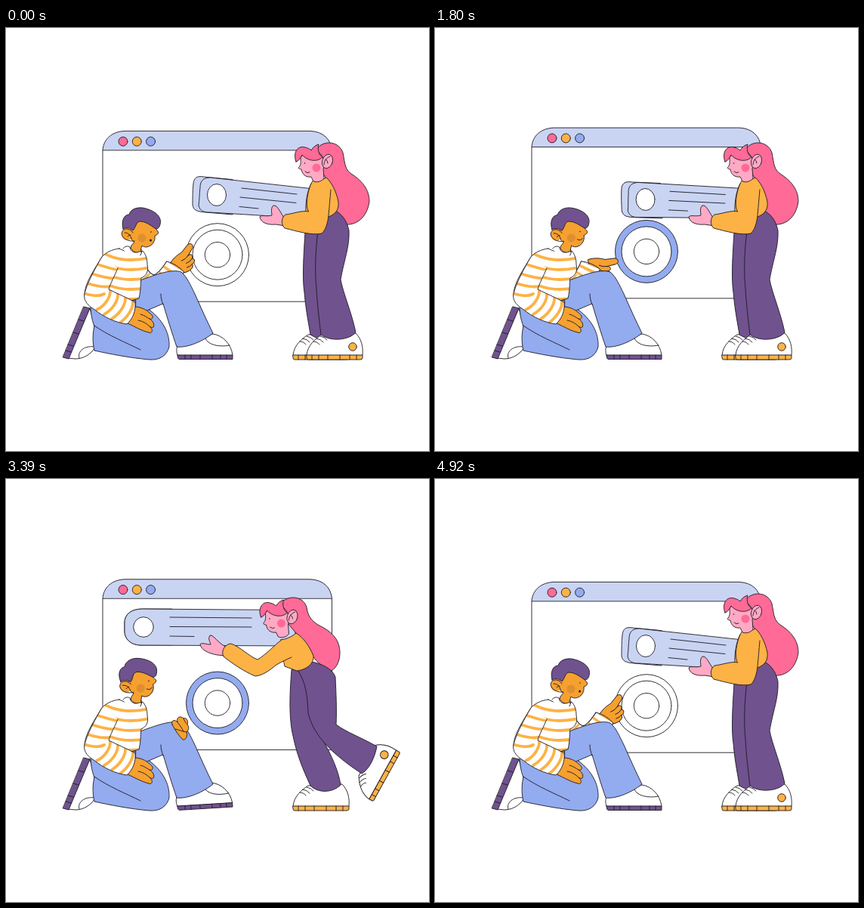
An HTML page with a canvas for the animation above (4.95 s loop, 560 by 560 pixels).

```html
<!DOCTYPE html>
<html lang="en">
<head>
<meta charset="utf-8">
<title>Building a page</title>
<style>
html, body { margin: 0; width: 100%; height: 100%; overflow: hidden; background: #fff; }
canvas { display: block; width: 100vw; height: 100vh; }
</style>
</head>
<body>
<canvas id="stage"></canvas>
<script>
const LOOP = 4950;
const INK = '#1f1b24', WHITE = '#fff', PALE = '#c9d4f3', BLUE = '#93abef', PURPLE = '#70528f',
  PINK = '#ff6a97', ROSE = '#ffa9c5', ORANGE = '#fdb245', TAN = '#f6a02f', AMBER = '#e08f30';
const canvas = document.getElementById('stage');
const c = canvas.getContext('2d');
const ratio = window.devicePixelRatio || 1;
canvas.width = canvas.height = 560 * ratio;

const rad = d => d * Math.PI / 180;
const lerp = (a, b, k) => a + (b - a) * k;
const clamp = k => Math.min(1, Math.max(0, k));
const part = (t, a, b) => clamp((t - a) / (b - a));
const cubic = p => p < .5 ? 4 * p ** 3 : 1 - 4 * (1 - p) ** 3;
const sine = p => .5 - .5 * Math.cos(Math.PI * p);

// Eased value from rows of [time, value]
function keyed(t, rows) {
  for (let i = 1; i < rows.length; i++) {
    if (t <= rows[i][0]) {
      const [t0, a] = rows[i - 1], [t1, b] = rows[i];
      return lerp(a, b, sine(part(t, t0, t1)));
    }
  }
  return rows[rows.length - 1][1];
}

// Blend of two path strings with the same commands
function mix(a, b, k) {
  const ends = b.match(/-?[\d.]+/g);
  let i = 0;
  return new Path2D(a.replace(/-?[\d.]+/g, v => lerp(+v, +ends[i++], k).toFixed(2)));
}

const asPath = p => typeof p === 'string' ? new Path2D(p) : p;

function shape(p, fill, ink = INK) {
  p = asPath(p);
  if (fill) { c.fillStyle = fill; c.fill(p); }
  if (ink) { c.strokeStyle = ink; c.stroke(p); }
}
const line = p => shape(p, null);

function oval(x, y, rx, ry, fill, ink = INK, turn = 0) {
  const p = new Path2D();
  p.ellipse(x, y, rx, ry, turn, 0, Math.PI * 2);
  shape(p, fill, ink);
}
const disc = (x, y, r, fill, ink) => oval(x, y, r, r, fill, ink);

function group(draw, x = 0, y = 0, turn = 0, px = 0, py = 0) {
  c.save();
  c.translate(x + px, y + py);
  c.rotate(rad(turn));
  c.translate(-px, -py);
  draw();
  c.restore();
}

function striped(path, draw) {
  shape(path, WHITE, null);
  c.save();
  c.clip(path);
  c.lineWidth = 3.8;
  c.strokeStyle = ORANGE;
  draw();
  c.restore();
}
const stripe = d => c.stroke(new Path2D(d));

function drawWindow(t) {
  shape('M128 162V362H431.5V162', WHITE);
  shape('M128 161.3C129 147 140 137 157 136.2H403C420 137 430 147 431.5 161.3Z', PALE);
  [PINK, ORANGE, BLUE].forEach((col, i) => disc(155 + 18.3 * i, 150, 6, col));

  const sweep = t < 4030 ? part(t, 150, 1630) * 360 : 0;
  if (sweep) {
    const a = rad(195), b = rad(195 + sweep), p = new Path2D();
    p.arc(280, 300, 41.5, a, b);
    p.arc(280, 300, 33, b, a, true);
    shape(p, BLUE, null);
  }
  disc(280, 300, 41.5, null);
  disc(280, 300, 33, null);
  disc(280, 300, 16.7, t > 4030 && t < 4520 ? BLUE : null);
}

function drawCard(t, k, dip) {
  const turn = keyed(t, [[0, 0], [510, -.3], [1230, -2.2], [1750, -3], [2450, 0], [3500, 0], [4230, -2.6], [LOOP, 0]]);
  group(() => {
    shape(mix(
      'M262 197C252 195 249 199 248 206C247 216 247 226 247 234C248 242 254 243 264 244L300 247L300 201Z',
      'M180 172C165 172 157 180 157 190C157 194 157 198 157 202C157 212 166 220 178 220L220 220L220 172.5Z', k), PALE);
    shape(mix(
      'M270 198C260 198 257 204 257 211C256 220 256 228 255 235C257 243 263 244 270 244L400 252L404 213Z',
      'M180 172C165 172 157 180 157 190C157 194 157 198 157 202C157 212 166 220 178 220L383 221L383 174Z', k), PALE);
    oval(lerp(279, 182, k), lerp(221, 196, k), lerp(12.5, 13.3, k), lerp(14.5, 13.3, k), WHITE);
    line(mix('M312 212L385 220M310 224L384 231.5M309 236.5L334 239',
      'M217 183L325 184M217 195.5L325 196M217 208L249 208.5', k));
  }, dip / 2, dip, turn, 395, 232);
}

// Trainer with its toe at the left; origin at the rear corner of the sole
function trainer(dot) {
  shape('M-74 -6C-73 -19 -62 -28 -54 -33L-9 -35C-1 -27 1 -16 0 -6Z', WHITE);
  shape('M-74 -6H0V-2Q0 0 -3 0H-72Q-74 0 -74 -2Z', ORANGE);
  line('M-67 -6V0M-58 -6V0M-46 -6V0M-30 -6V0M-17 -6V0M-8 -6V0');
  line('M-65 -24Q-60 -24 -57 -20M-61 -28Q-55 -27 -52 -23M-56 -31Q-50 -30 -47 -26');
  if (dot) disc(-13, -17, 5.3, ORANGE);
}

function womanHead(t) {
  shape('M390 170C390 178 391 180 388 184C386 186 389 187 391 187C392 194 397 198 404 197C405 199 406 201 407 203C412 205 418 203 421 199L420 186C424 180 420 168 412 163Z', ROSE);
  disc(411, 185, 5.5, PINK, null);
  shape('M384 177C379 164 387 155 396 158C400 159 402 160 404 162C406 158 410 155 414 154C412 161 414 168 419 171C412 178 399 176 392 168C390 172 388 176 384 177Z', PINK);
  oval(425.5, 176.5, 6.8, 9.5, ROSE, INK, rad(18));
  line('M421 181C421 176 424 172 429 170M423 174Q426 175 426 179');
  disc(395.5, 179, .8, INK, null);
  if (t > 350 && t < 1400) shape('M396 190Q399 192 402 190Q400 195 396 190', PINK);
  else line('M396 190Q399 193 402 191');
}

function drawWoman(t, k, step, dip) {
  const nod = keyed(t, [[0, 0], [1900, 0], [2340, 4], [2900, 0], [LOOP, 0]]);
  shape(mix(
    'M412 160C418 149 440 148 446 165C449 180 448 188 460 195C476 206 481 218 481 230C478 250 465 262 447 260C441 258 438 252 438 246L424 200L412 180Z',
    'M366 163C372 154 394 154 398 170C400 182 404 187 413 193C432 202 442 213 442 230C442 242 437 250 431 254C424 252 410 242 406 234L384 204L368 185Z', k), PINK);
  group(() => trainer(false), 454, 439);
  shape(mix(
    'M397 255C394 300 392 330 395 350C397 375 401 392 403 406C415 414 430 414 440 406C438 385 434 360 430 330L430 244Z',
    'M378 253C375 290 375 320 380 340C386 370 396 390 403 406C413 416 432 416 443 405C440 385 430 365 422 350L420 248Z', step), PURPLE);
  group(() => trainer(true), lerp(472, 522, step), lerp(439, 362, step), -61 * step);
  shape(mix(
    'M413 268C409 300 409 325 411 345C412 365 415 390 417 406C430 416 455 413 463 403C458 378 446 350 443 333C448 305 455 290 454 268C451 254 444 246 436 242L418 242Z',
    'M386 253C398 270 399 290 400 310C406 335 425 360 471 390C480 385 488 370 491 354C470 342 450 335 437 325C438 305 437 285 436 262C432 250 415 244 405 242L390 248Z', step), PURPLE);
  shape(mix(
    'M407 201C400 210 396 228 397 246L427 250C437 246 441 240 440 230C437 215 430 203 424 198C418 202 412 202 407 201Z',
    'M364 213C366 222 366 236 369 248L385 254C400 252 408 243 407 234C402 222 394 210 384 204C377 210 370 212 364 213Z', k), ORANGE);
  group(() => {
    shape(mix(
      'M368 251C362 242 359 234 354 235C350 238 352 245 352 248C345 250 338 247 336 250C337 258 347 261 357 260L370 262',
      'M291 222C280 217 275 206 270 207C267 212 270 215 271 219C265 219 258 216 257 219C258 226 268 231 280 233L291 234', k), ROSE);
    shape(mix(
      'M430 214C429 225 428 238 427 248C426 258 423 268 418 272C405 275 385 269 369 265C364 261 364 251 370 247C380 246 392 241 401 243C397 240 397 222 404 206',
      'M378 236C373 238 365 242 358 246C348 254 340 260 330 261C315 255 298 243 288 235C284 228 290 218 298 218C310 222 322 235 333 239C345 232 355 220 366 212', k), ORANGE);
  }, 0, dip);
  group(() => womanHead(t), -46.5 * k + nod, 6 * k, nod * .8, 412, 196);
}

function manHead(t) {
  shape('M166 252L195 252C197 262 198 267 201 269C203 272 200 274 197 275C198 283 193 289 186 290C183 290 181 289 180 288C179 292 178 294 178 297C172 299 167 295 165 291C165 288 168 286 170 283C163 281 165 270 166 252Z', TAN);
  disc(180, 278, 5.6, AMBER, null);
  shape('M155 266C152 254 157 247 163 247C165 239 176 236 185 239C197 242 207 250 204 260C203 265 200 267 197 265C191 261 185 256 177 256C172 257 172 264 168 268C164 264 158 264 155 266Z', PURPLE);
  oval(160.5, 273, 7.5, 8, TAN, null);
  line('M170 282C162 283 154 279 153 272C154 264 164 264 168 271M157 271C162 271 165 274 166 279M161 276Q163 273 165 274');
  disc(192, 270, .8, INK, null);
  if (t > 1000 && t < 4650) line('M188 280Q192 283 195 279');
  else disc(191.5, 281, 1.5, INK, null);
}

function fingerTip(t, bob) {
  const ringX = a => 280 + 38 * Math.cos(rad(a));
  const ringY = a => 297.6 + bob + 38 * Math.sin(rad(a));
  if (t >= 150 && t <= 1630) {
    const a = 195 + 360 * part(t, 150, 1630);
    return [ringX(a), ringY(a)];
  }
  const sx = ringX(195), sy = ringY(195);
  if (t < 150) return [lerp(246, sx, t / 150), lerp(286, sy, t / 150)];
  return [
    keyed(t, [[1630, sx], [1950, 242], [3650, 242], [4050, 280], [4480, 280], [LOOP, 246]]),
    keyed(t, [[1630, sy], [1950, 326], [3650, 326], [4050, 294], [4480, 294], [LOOP, 286]])
  ];
}

function drawFarArm(t, lean, bob) {
  const turn = keyed(t, [[0, -54], [150, -54], [510, -57], [870, -35], [1230, -8], [1450, -20], [1630, -45],
    [1950, 20], [3650, 20], [4050, -51], [LOOP, -54]]);
  const [tx, ty] = fingerTip(t, bob);
  const wx = tx - 37 * Math.cos(rad(turn)), wy = ty - 37 * Math.sin(rad(turn));
  const sx = lerp(168, 196, lean), sy = 313;
  const ex = lerp(sx, wx, .45), ey = Math.max(sy, wy) + lerp(50, 27, lean);

  group(() => {
    shape('M-2 -8C8 -9 14 -7 20 -4.5L33 -4C38 -3 38 3 33 4L21 5C26 5 27 10 22 11.5C24 15 20 18 16 16C14 21 6 20 -2 12Z', TAN);
    line('M21 5Q15 5 11 2M22 11.5Q16 12 12 9M16 16Q12 16 8 13');
  }, wx, wy, turn);

  const sleeve = new Path2D(`M${sx} ${sy}Q${ex} ${ey} ${wx} ${wy}`);
  const band = (w, col) => { c.lineWidth = w; c.strokeStyle = col; c.stroke(sleeve); };
  c.save();
  c.lineCap = 'butt';
  band(28, INK);
  band(26, WHITE);
  c.setLineDash([4, 7.5]);
  band(26, ORANGE);
  c.restore();
  const dir = Math.atan2(wy - ey, wx - ex), nx = -Math.sin(dir) * 13.5, ny = Math.cos(dir) * 13.5;
  line(`M${wx - nx} ${wy - ny}Q${wx + 4 * Math.cos(dir)} ${wy + 4 * Math.sin(dir)} ${wx + nx} ${wy + ny}`);
}

function drawMan(t, bob) {
  const lean = keyed(t, [[0, 0], [510, 1], [1230, 1], [1800, 0], [3600, 0], [4230, .45], [LOOP, 0]]);
  const resting = t >= 1950 && t <= 3650;
  if (!resting) drawFarArm(t, lean, bob);

  group(() => {
    shape('M111 371C113 380 117 388 117 395L117 424C113 431 103 438 92 438L82 437Z', WHITE);
    shape('M103 369L111 371L83 438L75.5 436Z', PURPLE);
    line('M97 437C94 428 104 420 117 422M96 386L103 388M89 403L96 405M82 419L89 421M79 427L86 429');
  }, 2 * lean);
  shape('M112 366L170 360L191 374C206 386 217 402 216 422C213 434 203 440 190 439C165 437 135 431 117 427C114 415 115 402 117 395C113 385 112 375 112 366Z', BLUE);
  line('M117 394C135 407 160 417 178 426');

  const tap = keyed(t, [[0, 0], [3150, 0], [3390, -3.5], [3650, 0], [LOOP, 0]]);
  group(() => {
    shape('M227 433C225 428 226 423 227 421L274 405C287 407 298 418 300 433Z', WHITE);
    shape('M227 433H300V438.5H229Q227 438 227 433Z', PURPLE);
    line('M237 433V438M245 433V438M257 433V438M273 433V438M284 433V438M292 433V438');
    line('M264 411C267 419 281 423 296 420');
  }, 0, 0, tap, 227, 436);
  shape('M172 336C195 328 218 318 232 323C240 330 244 340 250 352C258 370 266 388 274 404C262 414 240 424 226 422C220 405 214 385 208 365C198 369 187 374 172 380Z', BLUE);
  line('M208 366C206 361 205 357 205 352');

  if (resting) {
    shape('M220 325C218 319 224 318 227 322C225 315 231 313 235 317C239 315 242 321 240 325C243 328 242 333 239 335C241 340 238 346 234 345C229 340 224 333 220 325Z', TAN);
    line('M227 322C230 326 233 330 235 334M235 317C236 320 238 323 240 325M224 331C229 332 235 335 239 335');
  }

  const torso = mix(
    'M150 292C140 293 131 298 127 303C118 318 104 338 104 353C106 366 118 372 140 368L176 358C179 345 178 335 179 331C186 328 189 322 187 313C187 305 185 300 181 295C172 302 158 296 150 292Z',
    'M165 291C155 289 143 291 137 297C128 315 108 335 108 350C110 364 120 372 142 368L182 356C184 345 186 335 187 331C194 328 200 326 200 318C200 308 197 302 193 298C182 303 172 297 165 291Z', lean);
  striped(torso, () => {
    c.translate(14 * lean, 0);
    for (let i = 0; i < 6; i++) {
      const y = 287 + 13 * i;
      stripe(`M115 ${y}C135 ${y + 20} 165 ${y + 26} 205 ${y + 13}`);
    }
  });
  line(torso);

  group(() => {
    shape('M170 369C180 369 188 374 194 381C195 385 192 386 190 385C195 388 197 393 195 396C193 397 191 396 190 395C196 400 193 405 189 403C180 401 172 396 161 391Z', TAN);
    line('M190 385C186 383 183 380 178 379M190 395C186 391 181 388 175 387');
  }, 7 * lean, -6 * lean);

  const arm = mix(
    'M148 318C144 328 138 338 136 346C148 352 160 357 171 363C172 374 168 385 160 392C145 390 130 383 116 372C106 366 101 358 105 348C109 335 118 318 127 303',
    'M155 320C150 330 143 338 140 345C152 349 164 353 176 360C177 371 173 381 165 388C148 386 134 379 121 370C110 364 105 356 109 345C114 333 126 315 137 297', lean);
  striped(arm, () => {
    c.translate(5 * lean, -3 * lean);
    for (let i = 0; i < 4; i++) stripe(`M${118 - 5 * i} ${312 + 13 * i}q18 6 ${36 - 3 * i} ${10 - 3 * i}`);
    for (let i = 0; i < 4; i++) stripe(`M${138 + 10 * i} ${346 + 5 * i}c1 10 -7 22 -18 ${27 + i}`);
  });
  line(arm);

  const dx = keyed(t, [[0, 0], [510, 14], [1230, 14], [1900, 0], [3600, 0], [4230, 8], [LOOP, 0]]);
  const dy = keyed(t, [[0, 0], [510, 5], [1230, 5], [1900, 0], [3600, 0], [4230, 4], [LOOP, 0]]);
  const tilt = keyed(t, [[0, 0], [1500, 0], [2250, -6], [3390, -8], [4150, 0], [LOOP, 0]]);
  group(() => manHead(t), dx, dy, tilt, 172, 290);
  group(() => {
    shape('M155 292C157 289 161 288 164 290C165 296 170 299 177 296C181 299 181 301 178 304C167 303 158 299 155 292Z', WHITE, null);
    line('M155 292C157 289 161 288 164 290C165 296 170 299 177 296M179 293Q181 297 178 301');
  }, dx, dy * .4);
}

function draw(t) {
  c.setTransform(ratio, 0, 0, ratio, 0, 0);
  c.fillStyle = WHITE;
  c.fillRect(0, 0, 560, 560);
  c.lineWidth = .9;
  c.lineJoin = c.lineCap = 'round';

  const bob = 2.6 * Math.cos(2 * Math.PI * t / LOOP);
  const go = cubic(part(t, 1780, 2480));
  const body = go - cubic(part(t, 3500, 4500));
  const step = go - cubic(part(t, 3500, 4150));
  const dip = keyed(t, [[0, 0], [3500, 0], [4230, 4], [LOOP, 0]]);

  group(() => drawWindow(t), 0, bob - 2.4);
  drawCard(t, body, dip);
  drawWoman(t, body, step, dip);
  drawMan(t, bob);
}

const start = performance.now();
function tick() {
  draw((performance.now() - start) % LOOP);
  requestAnimationFrame(tick);
}
tick();
</script>
</body>
</html>
```
